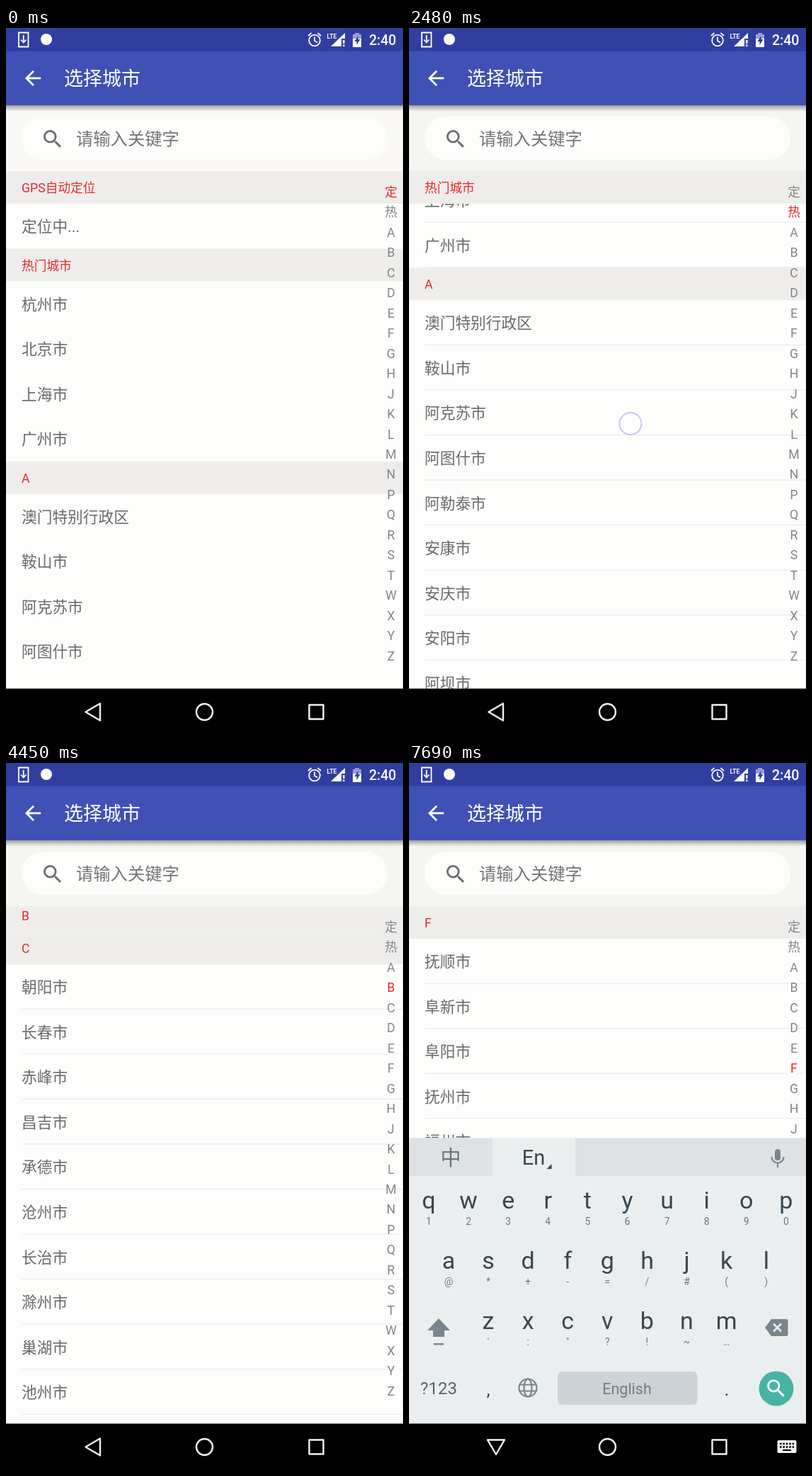
Animation of 561 by 998 pixels, one loop 8 s. Source, as an HTML page:

```html
<!DOCTYPE html>
<html lang="zh-CN">
<head>
<meta charset="utf-8">
<title>选择城市</title>
<style>
  html, body { margin: 0; width: 100%; height: 100%; overflow: hidden; background: #000; }
  svg { display: block; font-family: Roboto, "Noto Sans CJK SC", "Noto Sans CJK", sans-serif; }
  .row { font-size: 21.7px; fill: #696969; }
  .head { font-size: 17.7px; fill: #e8282f; }
  .band { fill: #eeedec; }
  .line { stroke: #e9e8ee; }
  .mid { text-anchor: middle; }
  .index text { font-size: 17.7px; fill: #858585; text-anchor: middle; }
  .index text.on { fill: #e8282f; }
  .key { font-size: 34px; fill: #37474f; text-anchor: middle; }
  .hint { font-size: 14px; fill: #6b7a81; text-anchor: middle; }
  .nav { fill: none; stroke: #f2f2f2; stroke-width: 2.4; stroke-linejoin: round; }
</style>
</head>
<body>
<svg width="561" height="998" viewBox="0 0 561 998">
  <defs>
    <linearGradient id="shade" x2="0" y2="1">
      <stop stop-color="#000" stop-opacity=".35"/>
      <stop offset="1" stop-color="#000" stop-opacity="0"/>
    </linearGradient>
    <clipPath id="view"><path d="M0 202h561v731H0z"/></clipPath>
    <path id="lens" d="M15.5 14h-.79l-.28-.27A6.47 6.47 0 0 0 16 9.5 6.5 6.5 0 1 0 9.5 16c1.61 0 3.09-.59 4.23-1.57l.27.28v.79l5 4.99L20.49 19zm-6 0a4.5 4.5 0 1 1 0-9 4.5 4.5 0 0 1 0 9z"/>
  </defs>

  <rect width="561" height="998" fill="#fdfdfc"/>
  <g clip-path="url(#view)">
    <g id="list"></g>
    <g id="sticky">
      <rect class="band" y="202" width="561" height="46"/>
      <text class="head" x="22" y="232"></text>
    </g>
  </g>
  <g id="index" class="index"></g>

  <g id="bubble">
    <rect x="233" y="519.5" width="95" height="95" rx="5" fill="#6c6c6c" opacity=".8"/>
    <text class="mid" x="280.5" y="589" font-size="57" fill="#fff"></text>
  </g>

  <rect id="searchArea" y="109" width="561" height="93"/>
  <rect x="22" y="125" width="517" height="61" rx="30" fill="#fdfdfc"/>
  <use href="#lens" transform="translate(48.7 139.7) scale(1.43)" fill="#6d6d6d"/>
  <text x="99" y="165" font-size="24.3" fill="#757575">请输入关键字</text>

  <rect y="109" width="561" height="9" fill="url(#shade)"/>
  <rect width="561" height="109.2" fill="#3f51b5"/>
  <rect width="561" height="32.8" fill="#303f9f"/>
  <path transform="translate(21.4 54.3) scale(1.39)" fill="#fff" d="M20 11H7.83l5.59-5.59L12 4l-8 8 8 8 1.41-1.41L7.83 13H20z"/>
  <text x="82" y="81" font-size="27" fill="#fff">选择城市</text>

  <g fill="none" stroke="#fff" stroke-width="1.8">
    <path d="M18 6.5h13.5v20H18zM24.75 10v10M21 16.5l3.75 4 3.75-4"/>
    <circle cx="436" cy="17.5" r="7.8"/>
    <path d="M436 12.5v5.5l4 2.5M427 11l4.5-4M445 11l-4.5-4"/>
  </g>
  <g fill="#fff">
    <circle cx="57" cy="16" r="8"/>
    <text x="453.5" y="14.5" font-size="8.5" font-weight="700">LTE</text>
    <path d="M459 26L479 7v8h-5v11z"/>
    <path d="M476 17h2.5v5h-2.5zM476 23.5h2.5v2.5h-2.5z"/>
    <path d="M493 7h6v2h3v6h-12V9h3z" opacity=".5"/>
    <path d="M490 15h12v12h-12z"/>
    <path d="M497.5 11l-5 8h3v5l5-8h-3z" fill="#303f9f"/>
    <text x="513" y="24" font-size="19.5" font-weight="500">2:40</text>
  </g>

  <g id="keyboard">
    <rect y="529.5" width="561" height="404" fill="#ebeeef"/>
    <path d="M0 529.5h118V583H0zM235 529.5h326V583H235z" fill="#dfe2e4"/>
    <text class="mid" x="59" y="568" font-size="29" fill="#66757c">中</text>
    <text class="mid" x="176" y="567" font-size="29" fill="#37474f">En</text>
    <path d="M201.5 566v7h-7z" fill="#37474f"/>
    <g fill="#78868c">
      <rect x="517" y="545" width="8" height="16" rx="4"/>
      <path d="M512.5 556a8.5 8.5 0 0 0 17 0M521 565v6" fill="none" stroke="#78868c" stroke-width="2.2"/>
      <path d="M42 784l16 17h-8v9H34v-9h-8zM35 819h14v2.5H35z"/>
      <path d="M512 785h21q2.5 0 2.5 2.5v19q0 2.5-2.5 2.5h-21l-9-12z"/>
    </g>
    <path d="M515 791.5l11 11m0-11l-11 11" stroke="#ebeeef" stroke-width="2.6"/>
    <text class="mid" x="42" y="891" font-size="24" fill="#55656c">?123</text>
    <text class="key" x="112" y="893" style="font-size:26px">,</text>
    <text class="key" x="449" y="893" style="font-size:26px">.</text>
    <g fill="none" stroke="#78868c" stroke-width="2.2">
      <circle cx="168" cy="882" r="12.5"/>
      <ellipse cx="168" cy="882" rx="5.5" ry="12.5"/>
      <path d="M156.5 877.5h23M156.5 886.5h23"/>
    </g>
    <rect x="210" y="859" width="197.5" height="47" rx="6" fill="#cdd3d6"/>
    <text class="mid" x="308" y="891" font-size="21.5" fill="#6f7d84">English</text>
    <circle cx="519" cy="883" r="24.5" fill="#48b3a5"/>
    <use href="#lens" transform="translate(502 866) scale(1.4)" fill="#fff"/>
  </g>

  <circle id="touch" r="15.5" fill="#fff" fill-opacity=".6" stroke="#c8c8ec" stroke-width="2"/>

  <rect y="932.5" width="561" height="66" fill="#000"/>
  <g class="nav">
    <path id="back" d="M112.5 965.5L133 953.5v24z"/>
    <circle cx="280.5" cy="965.5" r="11.5"/>
    <path d="M428.5 955.5h20v20h-20z"/>
  </g>
  <g id="imeIcon">
    <rect x="520.5" y="956" width="27" height="18" rx="2" fill="#f2f2f2"/>
    <path d="M524 961h20M524 965.5h20" stroke="#000" stroke-width="2.5" stroke-dasharray="2.5 1.9"/>
    <path d="M528 970h12" stroke="#000" stroke-width="2"/>
  </g>
</svg>

<script>
const ROW = 63.55, HEAD = 46, TOP = 202, LOOP = 8000;
const INDEX_Y = 231.5, INDEX_STEP = 28.46;
const LETTERS = '定热ABCDEFGHJKLMNPQRSTWXYZ';
const LABELS = { 定: 'GPS自动定位', 热: '热门城市' };
const CITIES = {
  定: '定位中...',
  热: '杭州 北京 上海 广州',
  A: '澳门特别行政区 鞍山 阿克苏 阿图什 阿勒泰 安康 安庆 安阳 阿坝 安顺',
  B: '北京 本溪 白山 白城 包头 博乐 巴彦淖尔 白银 宝鸡 保定 滨州 蚌埠 巴中 保山 毕节 北海 百色',
  C: '朝阳 长春 赤峰 昌吉 承德 沧州 长治 滁州 巢湖 池州 成都 重庆 常州 常德 长沙 郴州 潮州 楚雄 崇左',
  D: '大连 丹东 大庆 定西 敦煌 德州 东营 大同 达州 德阳 大理 都匀 东莞',
  E: '鄂尔多斯 恩施 鄂州',
  F: '抚顺 阜新 阜阳 抚州 福州 佛山 防城港',
  G: '固原 格尔木 广元 广安 赣州 贵阳 广州 桂林 贵港',
  H: '葫芦岛 哈尔滨 鹤岗 黑河 呼和浩特 哈密 和田 汉中 邯郸 衡水 菏泽 合肥 淮北 淮南 黄山 杭州 湖州 海口',
  J: '锦州 吉林 鸡西 佳木斯 酒泉 嘉峪关 济南 济宁 晋城 晋中 焦作 荆州 九江 嘉兴 金华 江门',
  K: '克拉玛依 库尔勒 喀什 开封 昆明 凯里',
  L: '辽阳 辽源 拉萨 兰州 临夏 廊坊 聊城 莱芜 临沂 临汾 六安 洛阳 漯河 泸州 乐山 丽江 柳州',
  M: '牡丹江 满洲里 马鞍山 绵阳 眉山 梅州 茂名',
  N: '南京 南通 南阳 内江 南充 内广安 南昌 宁波 南平 宁德 南宁',
  P: '盘锦 平凉 平顶山 濮阳 攀枝花 萍乡 莆田 普洱',
  Q: '齐齐哈尔 七台河 庆阳 秦皇岛 青岛 曲靖 衢州 泉州 清远 钦州',
  R: '日喀则 日照 瑞丽',
  S: '沈阳 四平 松原 双鸭山 绥化 石河子 商洛 石家庄 朔州 上海 苏州 宿迁 商丘 十堰 绍兴 深圳 三亚',
  T: '铁岭 通化 通辽 吐鲁番 天水 铜川 天津 唐山 泰安 太原 泰州 铜仁 台州',
  W: '乌海 乌鲁木齐 武威 渭南 威海 潍坊 芜湖 无锡 武汉 温州 梧州',
  X: '锡林浩特 西宁 西安 咸阳 邢台 忻州 宿州 徐州 新乡 许昌 襄阳 湘潭 厦门',
  Y: '营口 延吉 伊春 银川 伊宁 玉树 延安 榆林 烟台 阳泉 运城 盐城 扬州 宜昌 岳阳 宜宾 玉溪 玉林',
  Z: '张掖 中卫 张家口 淄博 镇江 郑州 周口 自贡 遵义 株洲 舟山 漳州 珠海 中山'
};

const $ = id => document.getElementById(id);
const show = (node, on) => node.style.display = on ? '' : 'none';

function add(parent, tag, attrs, text) {
  const node = document.createElementNS('http://www.w3.org/2000/svg', tag);
  for (const name in attrs) node.setAttribute(name, attrs[name]);
  if (text) node.textContent = text;
  parent.append(node);
  return node;
}

const label = i => LABELS[LETTERS[i]] || LETTERS[i];
const cityName = name => /[区.]$/.test(name) ? name : name + '市';

// The list is laid out once and then only moved.
const list = $('list'), tops = [], lines = [];
let y = 0;
[...LETTERS].forEach((letter, i) => {
  tops.push(y);
  add(list, 'rect', { class: 'band', y, width: 561, height: HEAD });
  add(list, 'text', { class: 'head', x: 22, y: y + 30 }, label(i));
  y += HEAD;
  for (const city of CITIES[letter].split(' ')) {
    add(list, 'text', { class: 'row', x: 22, y: y + 40 }, cityName(city));
    y += ROW;
    lines.push(add(list, 'path', { class: 'line', d: `M22 ${y - .5}H561` }));
  }
});
const located = list.querySelector('.row');

const marks = [...LETTERS].map((letter, i) =>
  add($('index'), 'text', { x: 544, y: INDEX_Y + i * INDEX_STEP + 6.5 }, letter));

function keyRow(keys, hints, x, baseline) {
  [...keys].forEach((key, i) => {
    add($('keyboard'), 'text', { class: 'key', x: x + i * 56.1, y: baseline }, key);
    add($('keyboard'), 'text', { class: 'hint', x: x + i * 56.1, y: baseline + 22.5 }, hints[i]);
  });
}
keyRow('qwertyuiop', '1234567890', 28, 629);
keyRow('asdfghjkl', '@*+-=/#()', 56, 714);
keyRow('zxcvbnm', '\':"?!~…', 112, 799);

// Points are [time, value, value...]; values run straight between them.
function track(points, t) {
  const n = points.findIndex(p => p[0] > t);
  if (n === 0) return points[0].slice(1);
  if (n < 0) return points[points.length - 1].slice(1);
  const a = points[n - 1], b = points[n], k = (t - a[0]) / (b[0] - a[0]);
  return a.slice(1).map((v, i) => v + (b[i + 1] - v) * k);
}

const DRAG = [[1000, 335, 830], [1300, 335, 775], [1910, 331, 624], [2300, 322, 545],
  [2500, 312, 560], [3070, 289, 812], [3180, 287, 832]];
const SWIPE = [[3300, 300, 800], [3480, 310, 420]];
const SLIDE = [[4830, 540, 340], [5310, 531, 533], [5430, 529, 592], [5700, 526, 715],
  [6005, 521, 649], [6120, 519, 620], [6730, 522, 431]];
const SCROLL = [[1000, 0], [1300, 55], [1910, 206], [2300, 287], [2500, 272],
  [3070, 22.3], [3180, 0], [3300, 0], [3480, 380]];
const GESTURES = [[DRAG, 1000, 3190], [SWIPE, 3300, 3480], [SLIDE, 4830, 6840]];
const SELECT_LAG = 80, STICKY_LAG = 115, SLIDE_START = 4830;

const flingDecay = t => 1 - Math.exp(-(t - 3480) / 400);
const flingSpan = (tops[3] + HEAD + 7 * ROW - 50 - 380) / flingDecay(3830);

const freeScroll = t => t < 3480 ? track(SCROLL, t)[0] : 380 + flingSpan * flingDecay(Math.min(t, 4640));
const slideIndex = t => Math.round((track(SLIDE, t)[1] - INDEX_Y) / INDEX_STEP);

function draw(t) {
  const sliding = t >= SLIDE_START + SELECT_LAG;
  const picked = slideIndex(t - SELECT_LAG);
  const scroll = sliding ? tops[picked] : freeScroll(t);
  const current = sliding ? picked : tops.filter(top => top <= scroll).length - 1;
  const stuck = sliding && t >= SLIDE_START + STICKY_LAG ? slideIndex(t - STICKY_LAG) : current;
  const push = sliding ? 0 : Math.min(0, tops[current + 1] - HEAD - scroll);

  list.setAttribute('transform', `translate(0 ${TOP - scroll})`);
  $('sticky').setAttribute('transform', `translate(0 ${push})`);
  $('sticky').lastElementChild.textContent = label(stuck);
  located.textContent = t < 660 ? '定位中...' : '杭州市';
  marks.forEach((mark, i) => mark.classList.toggle('on', i === current));

  const settled = t >= 310;
  lines.forEach(line => show(line, settled));
  $('searchArea').setAttribute('fill', settled ? '#f5f5f2' : '#fbf9f8');

  show($('bubble'), sliding && t < 6840);
  $('bubble').lastElementChild.textContent = LETTERS[picked];

  const gesture = GESTURES.find(([, from, to]) => t >= from && t < to);
  show($('touch'), gesture);
  if (gesture) {
    const [cx, cy] = track(gesture[0], t);
    $('touch').setAttribute('transform', `translate(${cx} ${cy})`);
  }

  const rise = Math.min(1, Math.max(0, (t - 7180) / 280));
  show($('keyboard'), rise > 0);
  show($('imeIcon'), rise > 0);
  $('keyboard').setAttribute('transform', `translate(0 ${404 * (1 - rise) ** 3})`);
  $('back').setAttribute('transform', rise > 0 ? 'rotate(-90 123 965.5)' : '');
}

function frame() {
  draw(performance.now() % LOOP);
  requestAnimationFrame(frame);
}
frame();
</script>
</body>
</html>
```
